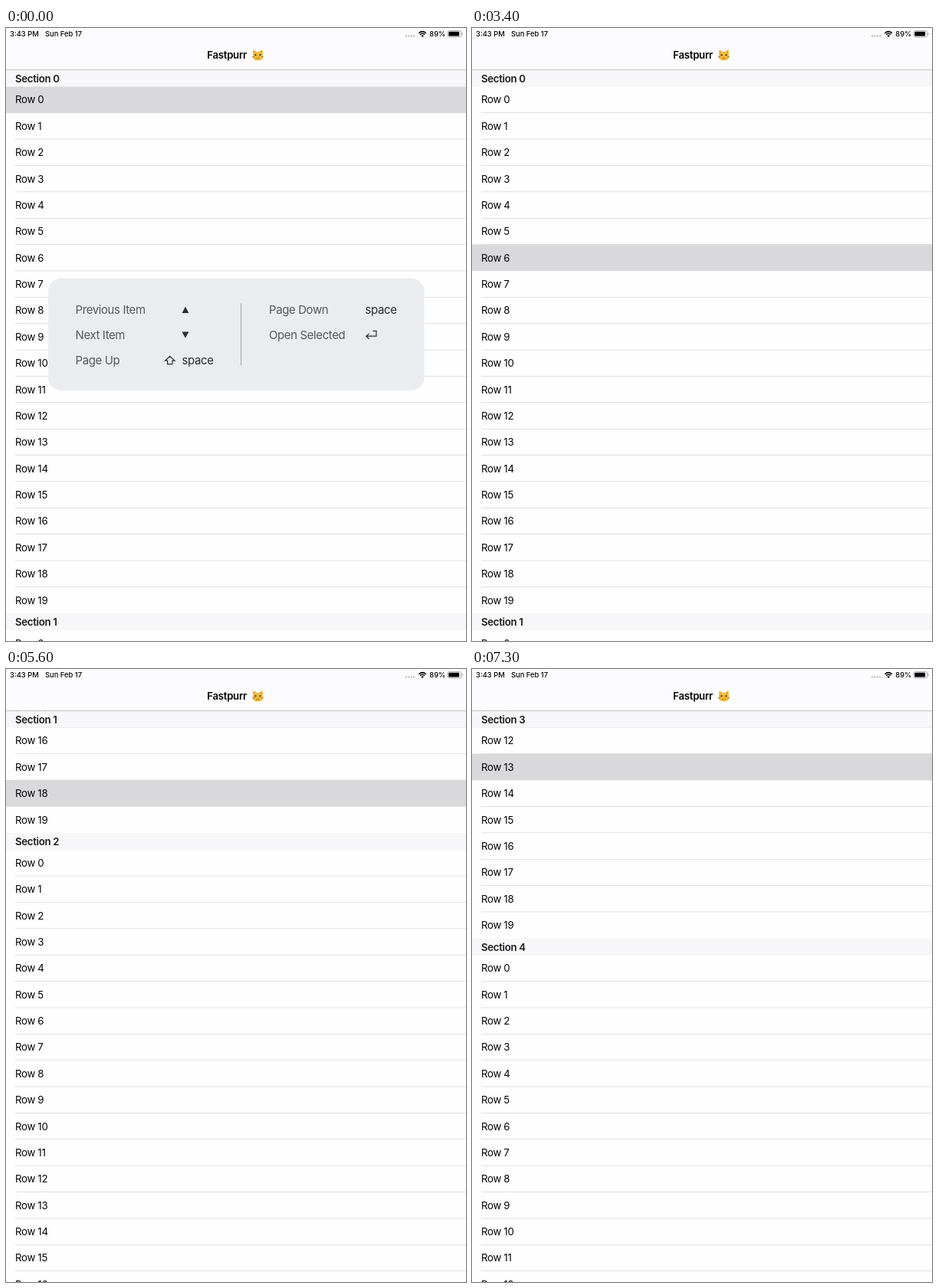
Recreate the animation shown at these times as an HTML page with a canvas. Size 600 by 800 pixels, loop 7400 ms.

```html
<!DOCTYPE html>
<html lang="en">
<head>
<meta charset="utf-8">
<title>Table with keyboard navigation</title>
<style>
html, body { margin: 0; width: 100%; height: 100%; overflow: hidden; background: #fefdff; }
canvas { display: block; }
</style>
</head>
<body>
<canvas id="stage" width="600" height="800"></canvas>
<script>
const ctx = document.getElementById('stage').getContext('2d');
const LOOP = 7400;
const PT = 600 / 768;                 // pixels per layout point
const ROW = 44 * PT, HEADER = 28 * PT, NAV = 70 * PT, INSET = 12;
const ROWS = 20, SECTIONS = 6, SECTION = HEADER + ROWS * ROW;
const PAPER = '#fefdff', INK = '#050506';

const rowOffset = index => Math.floor(index / ROWS) * SECTION + index % ROWS * ROW;
const FIRST = rowOffset(36), SECOND = rowOffset(72), PAGE = 682;

// [start time, selected row, scroll offset]
const steps = [
  [0, 0, 0], [2500, 1, 0], [2700, 2, 0], [2900, 3, 0], [3100, 4, 0],
  [3300, 5, 0], [3400, 6, 0], [3700, 7, 0],
  [4000, 7, 30], [4100, 7, 190], [4200, 7, 396], [4500, 7, 673.2], [4600, 7, PAGE],
  [4800, 7, PAGE + 190], [4900, 7, PAGE + 396],
  [5200, 36, FIRST], [5300, 37, FIRST], [5600, 38, FIRST], [5700, 39, FIRST],
  [6000, 39, FIRST + 30], [6100, 39, FIRST + 190], [6200, 39, FIRST + 396],
  [6400, 39, FIRST + 673], [6500, 39, FIRST + PAGE], [6600, 39, FIRST + PAGE + 250],
  [6800, 39, FIRST + 2 * PAGE], [7200, 72, SECOND], [7300, 73, SECOND]
];

function rect(x, y, w, h, color) {
  ctx.fillStyle = color;
  ctx.fillRect(x, y, w, h);
}

function text(str, x, y, size, weight = 400, color = INK, spacing = -0.32) {
  ctx.font = `${weight} ${size}px Inter, sans-serif`;
  ctx.letterSpacing = spacing + 'px';
  ctx.fillStyle = color;
  ctx.fillText(str, x, y);
}

function shape(path, color, lineWidth) {
  const p = new Path2D(path);
  if (lineWidth) {
    ctx.lineWidth = lineWidth;
    ctx.strokeStyle = color;
    ctx.stroke(p);
  } else {
    ctx.fillStyle = color;
    ctx.fill(p);
  }
}

function drawTable(selected, scroll) {
  for (let s = 0; s < SECTIONS; s++) {
    const top = NAV + s * SECTION - scroll;
    for (let r = 0; r < ROWS; r++) {
      const y = top + HEADER + r * ROW;
      if (y < 0 || y > 800) continue;
      if (s * ROWS + r === selected) rect(0, y - 0.4, 600, ROW + 0.4, '#d9d8da');
      else if (r < ROWS - 1) rect(INSET, y + ROW - 0.5, 588, 0.5, '#c4c3c8');
      text('Row ' + r, INSET, y + ROW / 2 + 4.7, 13.28);
    }
  }
  for (let s = 0; s < SECTIONS; s++) {
    const top = NAV + s * SECTION - scroll;
    const y = Math.max(top, Math.min(NAV, top + SECTION - HEADER));
    rect(0, y, 600, HEADER, '#f7f6f8');
    text('Section ' + s, INSET, y + HEADER / 2 + 5, 13.28, 600, '#1c1c1e');
  }
}

function drawCat() {
  shape('M322 36L322.3 28.6Q325 29 326.6 31H330.4Q332 29 334.7 28.6L335 36Q336 42.3 328.5 42.5Q321 42.3 322 36Z', '#f3bd3c');
  shape('M323.2 30.2L325.2 31.6L323.3 33ZM333.8 30.2L331.8 31.6L333.7 33Z', '#d98a4a');
  shape('M324.4 35.3a1.1 1.3 0 1 0 2.2 0a1.1 1.3 0 1 0 -2.2 0M330.4 35.3a1.1 1.3 0 1 0 2.2 0a1.1 1.3 0 1 0 -2.2 0', '#4c3320');
  shape('M326.3 39.4Q327.6 40.5 328.5 39Q329.4 40.5 330.7 39.4M320.8 37.5L324 38M336.2 37.5L333 38', '#77501f', 0.7);
}

function drawBars() {
  rect(0, 0, 600, NAV, '#fcfbfd');
  rect(0, 54.3, 600, 0.8, '#b8b7bb');
  text('3:43 PM', 5, 11.3, 9.4, 500, INK, 0);
  text('Sun Feb 17', 51, 11.3, 9.4, 500, INK, 0);
  text('89%', 552.3, 11.3, 9.4, 500, INK, 0);
  for (let i = 0; i < 4; i++) rect(521 + i * 3.4, 9.4, 2.1, 2.1, '#bdbcc0');
  shape('M538.4 6.7Q543.2 2.5 548 6.7M540 8.6Q543.2 5.8 546.4 8.6', INK, 1.5);
  shape('M541.4 10Q543.2 8.6 545 10L543.2 12Z', INK);
  ctx.beginPath();
  ctx.roundRect(576.2, 3.6, 17.6, 8.2, 2.2);
  ctx.lineWidth = 0.7;
  ctx.strokeStyle = '#8a898d';
  ctx.stroke();
  ctx.beginPath();
  ctx.roundRect(577.4, 4.8, 13.8, 5.8, 1.2);
  ctx.fillStyle = INK;
  ctx.fill();
  rect(594.6, 6.4, 0.9, 2.6, '#8a898d');
  text('Fastpurr', 262.3, 39.8, 13.28, 600);
  drawCat();
}

function drawShortcuts() {
  const label = (str, x, y) => text(str, x, y, 15, 400, '#58585c', -0.4);
  const key = (str, x, y) => text(str, x, y, 15, 400, '#2c2c2f', -0.4);
  label('Previous Item', 90.5, 373.3);
  label('Next Item', 90.5, 406.1);
  label('Page Up', 90.5, 439);
  label('Page Down', 343, 373.3);
  label('Open Selected', 343, 406.1);
  key('space', 229.5, 439);
  key('space', 468.5, 373.3);
  shape('M234 363.6L238.4 372H229.6ZM234 404.8L238.4 396.4H229.6Z', '#2c2c2f');
  shape('M213.8 428.4L220 434.2H217V438.6H210.6V434.2H207.6Z', '#2c2c2f', 1.2);
  shape('M478.4 395.4H483V402.2H470M473.6 398.6L469.8 402.2L473.6 405.8', '#2c2c2f', 1.2);
  rect(306.3, 359.5, 0.8, 81, '#8e8e93');
}

function drawPanel(fading) {
  ctx.save();
  if (fading) {
    ctx.translate(300, 400);
    ctx.scale(0.953, 0.953);
    ctx.translate(-300, -400);
  }
  ctx.beginPath();
  ctx.roundRect(55, 326.7, 490.5, 146.6, 17);
  ctx.fillStyle = fading ? PAPER : '#ebecef';
  ctx.fill();
  if (fading) ctx.globalAlpha = 0.06;
  drawShortcuts();
  ctx.restore();
}

function frame(now) {
  const t = now % LOOP;
  const [, selected, scroll] = steps.findLast(step => step[0] <= t);
  rect(0, 0, 600, 800, PAPER);
  drawTable(selected, scroll);
  drawBars();
  if (t < 2300) drawPanel(t >= 2100);
  requestAnimationFrame(frame);
}

requestAnimationFrame(() => {
  const start = performance.now();
  frame(0);
  const tick = () => performance.now() - start;
  const baseFrame = frame;
  frame = () => baseFrame(Math.max(0, tick()));
});
</script>
</body>
</html>
```
